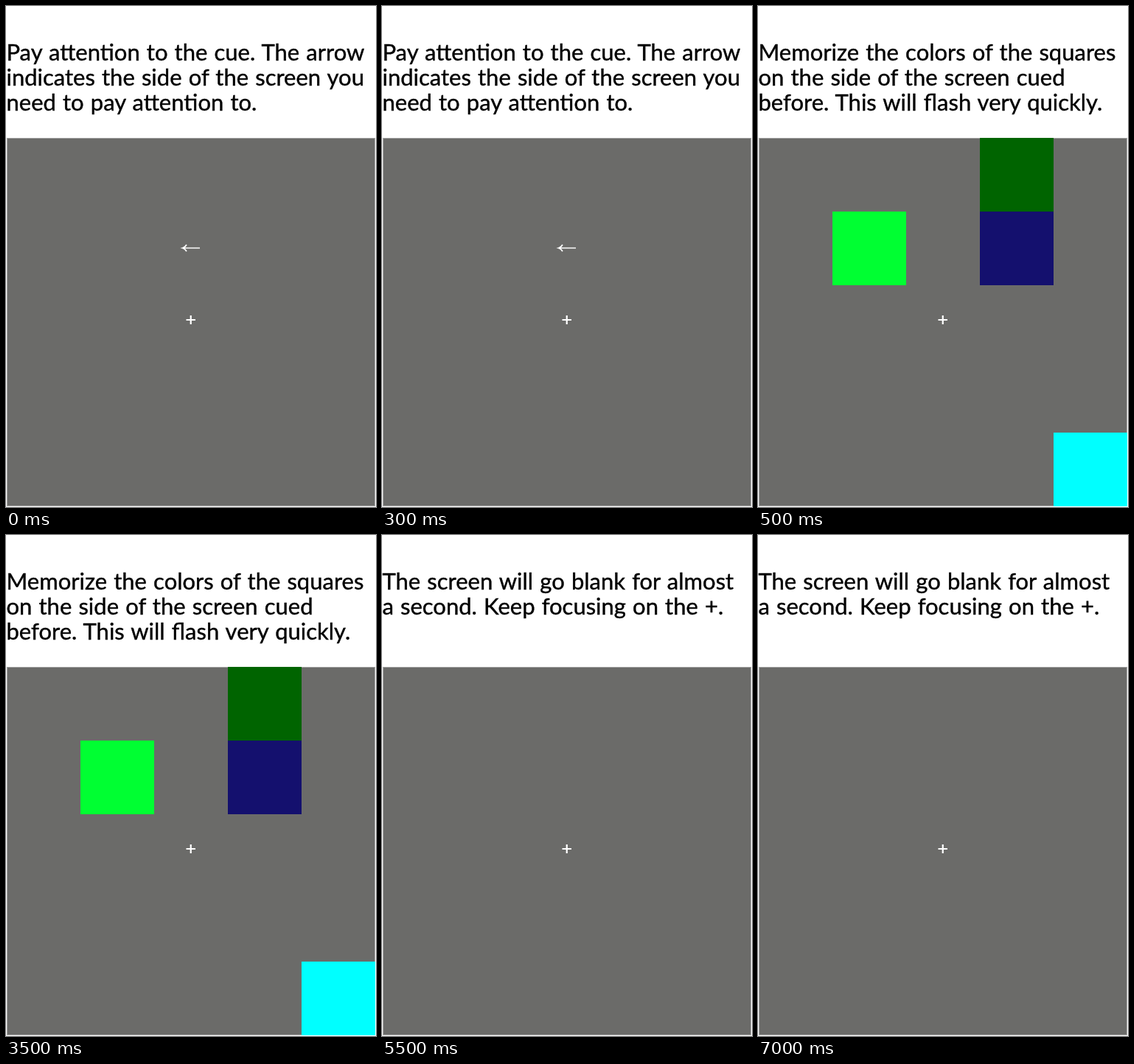
Write an HTML page that moves like this. It is 502 px wide and 680 px high and loops after 8 s.

```html
<!DOCTYPE html>
<html lang="en">
<head>
<meta charset="utf-8">
<title>Attention task</title>
<style>
  html, body { margin: 0; width: 100%; height: 100%; overflow: hidden; background: #fff; }
  svg { display: block; width: 502px; height: 680px; }
  text { font: 31px Lato, Carlito, sans-serif; word-spacing: 1.2px; fill: #000; stroke: #000; stroke-width: .4px; }
  .scene { visibility: hidden; }
  .scene.on { visibility: visible; }
</style>
</head>
<body>
<svg viewBox="0 0 502 680">
  <rect x="1.5" y="179.5" width="499" height="499" fill="#6b6b69" stroke="#a2a2a1"/>
  <path d="M244.5 426H257M250.75 420V432" stroke="#fff" stroke-width="2.2"/>

  <g class="scene">
    <text x="0.5" y="74">Pay attention to the cue. The arrow</text>
    <text x="0.5" y="108">indicates the side of the screen you</text>
    <text x="0.5" y="142">need to pay attention to.</text>
    <path d="M263 328.5H240M245 324Q243 327.5 239.5 328.5Q243 329.5 245 333"
          fill="none" stroke="#fff" stroke-width="1.7"/>
  </g>

  <g class="scene">
    <text x="0.5" y="74">Memorize the colors of the squares</text>
    <text x="0.5" y="108">on the side of the screen cued</text>
    <text x="0.5" y="142">before. This will flash very quickly.</text>
    <rect x="301" y="179" width="100" height="100" fill="#006400"/>
    <rect x="101" y="279" width="100" height="100" fill="#00ff32"/>
    <rect x="301" y="279" width="100" height="100" fill="#14106e"/>
    <rect x="401" y="579" width="100" height="100" fill="#00ffff"/>
  </g>

  <g class="scene">
    <text x="0.5" y="74">The screen will go blank for almost</text>
    <text x="0.5" y="108">a second. Keep focusing on the +.</text>
  </g>
</svg>
<script>
  const LOOP = 8000;
  const sceneEnds = [500, 5500, LOOP];
  const scenes = document.querySelectorAll('.scene');
  const start = performance.now();

  function draw() {
    const time = (performance.now() - start) % LOOP;
    const current = sceneEnds.findIndex(end => time < end);
    scenes.forEach((scene, i) => scene.classList.toggle('on', i === current));
    requestAnimationFrame(draw);
  }
  draw();
</script>
</body>
</html>
```
